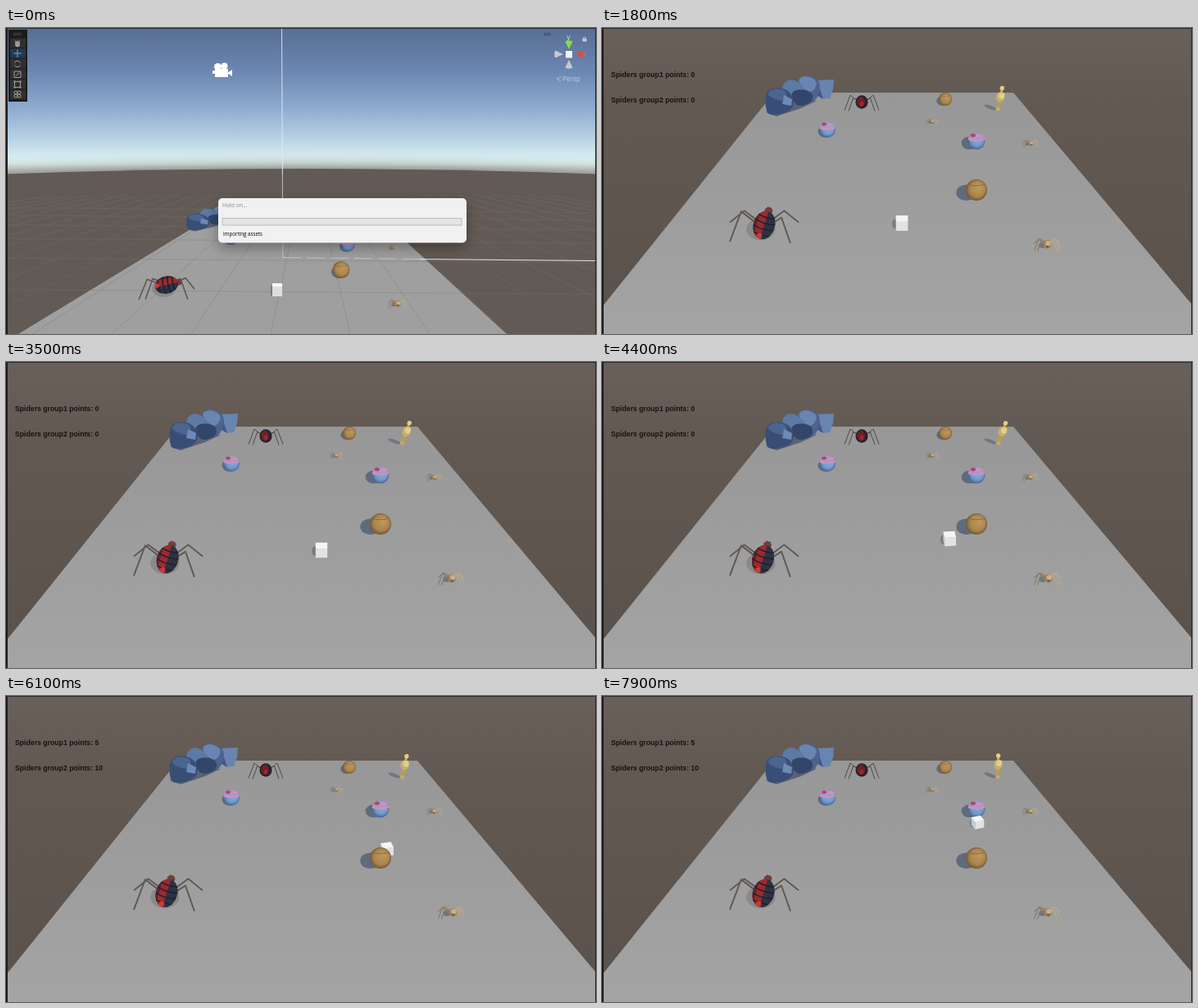
An HTML page with a canvas that plays this animation: 720 by 374 pixels, repeating every 8000 ms.

```html
<!DOCTYPE html>
<html lang="en">
<head>
<meta charset="utf-8">
<title>Spider game</title>
<style>
html, body { margin: 0; width: 100%; height: 100%; overflow: hidden; background: #5d5650; }
canvas { display: block; }
</style>
</head>
<body>
<canvas id="stage" width="720" height="374"></canvas>
<script>
const W = 720, H = 374, LOOP = 8000, PLAY = 1800;
const c = document.getElementById('stage').getContext('2d');

function poly(points, fill) {
  c.beginPath();
  for (let i = 0; i < points.length; i += 2) c.lineTo(points[i], points[i + 1]);
  c.closePath();
  c.fillStyle = fill;
  c.fill();
}
// Closed curve that rounds off every corner of the outline
function blob(points, fill) {
  const n = points.length;
  c.beginPath();
  for (let i = 0; i <= n; i += 2) {
    const x = points[i % n], y = points[(i + 1) % n];
    const mx = (x + points[(i + 2) % n]) / 2, my = (y + points[(i + 3) % n]) / 2;
    if (i) c.quadraticCurveTo(x, y, mx, my);
    else c.moveTo(mx, my);
  }
  c.fillStyle = fill;
  c.fill();
}
function line(points, color, width = 1) {
  c.beginPath();
  for (let i = 0; i < points.length; i += 2) c.lineTo(points[i], points[i + 1]);
  c.strokeStyle = color;
  c.lineWidth = width;
  c.stroke();
}
function oval(x, y, rx, ry, fill, turn = 0) {
  c.beginPath();
  c.ellipse(x, y, rx, ry, turn, 0, 7);
  c.fillStyle = fill;
  c.fill();
}
function bowl(x, y, rx, ry, color, width) {
  c.beginPath();
  c.ellipse(x, y, rx, ry, 0, 0, Math.PI);
  c.strokeStyle = color;
  c.lineWidth = width;
  c.stroke();
}
function rect(x, y, w, h, fill) {
  c.fillStyle = fill;
  c.fillRect(x, y, w, h);
}
function text(str, x, y, font, fill) {
  c.font = font;
  c.fillStyle = fill;
  c.fillText(str, x, y);
}
function fade(y, ...stops) {
  const g = c.createLinearGradient(0, 0, 0, y);
  stops.forEach(([at, color]) => g.addColorStop(at, color));
  return g;
}
function at(x, y, sx, sy, draw) {
  c.save();
  c.translate(x, y);
  c.scale(sx, sy);
  draw();
  c.restore();
}

function ball(x, y, r, pink, shadow = 1) {
  oval(x - r * shadow, y + r * .25, r * .95, r * .75, '#5f6b7c');
  const g = c.createRadialGradient(x + r * .3, y - r * .3, r * .1, x, y, r * 1.05);
  const tones = pink ? ['#84b2da', '#7098c8', '#415b88'] : ['#bd985d', '#aa864e', '#6b5230'];
  tones.forEach((tone, i) => g.addColorStop([0, .65, 1][i], tone));
  oval(x, y, r, r, g);
  c.save();
  c.beginPath();
  c.arc(x, y, r, 0, 7);
  c.clip();
  if (pink) {
    oval(x, y - r * .6, r * 1.05, r * .7, '#a996c8');
    bowl(x, y - r * .35, r, r * .28, '#c793bd', r * .2);
    bowl(x, y - r * .8, r * .9, r * .25, '#d292b4', r * .22);
    oval(x - r * .4, y - r * .65, r * .3, r * .2, '#a84a6a');
  } else {
    bowl(x, y - r * .65, r * .8, r * .25, '#836237', Math.max(.5, r * .06));
  }
  c.restore();
}

// Leg shapes: knee x, y and foot x, y, in units of half the span
const LEG = {
  wide: [.67, -.4, 1, .48], near: [.5, -.22, .76, .52], far: [.58, -.42, 1, -.08],
  low: [.7, -.2, 1, .53], front: [.68, -.25, 1, .15],
};

function legs(size, side, names, color, width) {
  names.forEach((name, i) => {
    const [kx, ky, fx, fy] = LEG[name].map(v => v * size);
    line([side * size * .15, -size * .1 * i, side * kx, ky, side * fx, fy], color, width);
  });
}
function bigSpider(x, y, size, left, right, turn, sway) {
  at(x, y, 1, 1, () => {
    oval(-size * .1, size * .12, size * .42, size * .32, '#0002');
    for (const [side, names] of [[-1, left], [1, right]]) {
      legs(size, side, names, '#454244', size * .042);
      legs(size, side, names, '#827263', size * .017);
    }
    c.translate(sway, 0);
    c.rotate(turn);
    const rx = size * .31, ry = size * .42;
    oval(0, -ry * 1.05, rx * .38, ry * .24, '#67453c');
    line([-2, -ry * 1.1, -2, -ry * 1.3], '#8e2f2f', 1.2);
    line([2, -ry * 1.1, 2, -ry * 1.3], '#8e2f2f', 1.2);
    oval(0, 0, rx, ry, '#2c3243');
    c.beginPath();
    c.ellipse(0, 0, rx, ry, 0, 0, 7);
    c.clip();
    rect(-rx, -ry, rx, ry * 2, '#9c2a2f');
    rect(-rx, -ry, rx * .3, ry * 2, '#5c2430');
    for (let k = -.75; k < 1; k += .42) bowl(0, ry * k, rx * 1.05, ry * .2, '#1d202b', 1.5);
    oval(-rx * .15, ry * .82, rx * .25, ry * .2, '#cf3a33');
  });
}
function redSpider(x, y, size) {
  at(x, y, 1, 1, () => {
    for (const side of [-1, 1]) legs(size, side, ['wide', 'near'], '#4a4547', size * .045);
    oval(0, 0, size * .36, size * .39, '#26222c');
    oval(-size * .04, -size * .02, size * .23, size * .3, '#6c222a');
    oval(0, size * .1, size * .1, size * .14, '#a32830');
  });
}
function tanSpider(x, y, size, sway = 0) {
  at(x, y, 1, 1, () => {
    oval(-size * .35, size * .08, size * .3, size * .2, '#6f7581');
    const width = Math.max(.6, size * .07);
    legs(size, -1, ['wide', 'near', 'far'], '#8a7866', width);
    legs(size, 1, ['wide', 'near', 'far'], '#bda88c', width);
    oval(sway, 0, size * .3, size * .33, '#a08259');
    oval(sway + size * .06, -size * .08, size * .2, size * .18, '#ccb088');
    oval(sway, size * .18, size * .1, size * .07, '#6a523d');
  });
}
function figure(x, y, scale, lean) {
  oval(x - 9 * scale, y - 4, 8 * scale, 2.2, '#6f7883', .35);
  at(x, y, scale, scale, () => {
    c.rotate(lean);
    poly([-3, -13, 3, -13, 2, -1, -2, -1], '#b59c5c');
    oval(0, -2, 2.8, 2.2, '#c5ab62');
    oval(0, -17, 5.2, 6.2, '#c5ae6b');
    oval(1.2, -19, 3.6, 4, '#e2cf8a');
    rect(-1.4, -27, 2.8, 5, '#c7ae65');
    oval(0, -28, 2.7, 2.7, '#e4ce80');
  });
}
function cube(x, y, turn, scale) {
  const ring = [0, 1, 2, 3].map(i => {
    const a = turn + Math.PI / 4 + i * Math.PI / 2;
    return [10.4 * Math.cos(a) * scale, 5.5 * Math.sin(a) * scale];
  });
  const h = 5.5 * scale;
  oval(x - 8 * scale, y + 1, 4 * scale, 6 * scale, '#747d88');
  at(x, y, 1, 1, () => {
    ring.forEach(([x1, y1], i) => {
      const [x2, y2] = ring[(i + 1) % 4];
      if (x1 > x2) poly([x1, y1 - h, x2, y2 - h, x2, y2 + h, x1, y1 + h], y1 < y2 ? '#e2e2e2' : '#c8cacd');
    });
    poly(ring.flatMap(([px, py]) => [px, py - h]), '#f5f5f5');
  });
}
function shells() {
  poly([200, 103, 213, 108, 243, 98, 262, 89, 234, 90], '#5a6372');
  poly([262, 64, 283, 63, 282, 75, 278, 86, 270, 87, 260, 76], '#6884b0');
  poly([262, 63, 270, 87, 258, 80], '#435880');
  blob([235, 66, 249, 56, 266, 64, 266, 80, 256, 94, 240, 86], '#4b638e');
  blob([237, 64, 249, 57, 265, 66, 254, 82], '#6a85b1');
  blob([219, 69, 231, 61, 248, 72, 246, 86, 231, 96, 221, 86], '#5d79a5');
  blob([229, 78, 245, 74, 258, 80, 256, 92, 236, 97], '#33466a');
  blob([200, 78, 212, 72, 228, 76, 236, 90, 229, 103, 203, 108, 199, 95], '#394e75');
  blob([201, 80, 211, 73, 227, 77, 223, 91, 206, 85], '#4c6590');
  poly([222, 82, 232, 87, 231, 95, 220, 93], '#6d89b5');
}

function cone(x, y, turn, fill) {
  c.save();
  c.translate(x, y);
  c.rotate(turn);
  poly([0, 0, -4.3, -9, 4.3, -9], fill);
  oval(0, -9, 4.3, 1.7, fill);
  c.restore();
}
function toolbar() {
  rect(3, 2, 23, 88, '#1b1b1b');
  line([9, 6.5, 19, 6.5], '#444');
  line([9, 8.5, 19, 8.5], '#444');
  for (let i = 0; i < 6; i++) rect(5, 12.5 + i * 12.6, 19, 11.6, i == 1 ? '#203a52' : '#303030');
  const ink = '#9c9c9c';
  oval(14, 20, 3, 3.2, ink);
  for (let i = -1; i < 3; i++) line([14 + i * .7, 20, 13 + i * 1.8, 15.5], ink, 1.1);
  line([9, 31, 19, 31], '#7fa3c4');
  line([14, 26.5, 14, 36], '#7fa3c4');
  c.beginPath();
  c.arc(14, 44, 3.7, .4, 2.8);
  c.moveTo(10.4, 43);
  c.arc(14, 44, 3.7, 3.4, 5.9);
  c.strokeStyle = ink;
  c.stroke();
  c.strokeRect(10, 53, 8, 7.5);
  line([12, 58.5, 16.5, 54.5], ink);
  c.strokeRect(10.5, 65.5, 7, 7);
  for (const [x, y] of [[10.5, 65.5], [17.5, 65.5], [10.5, 72.5], [17.5, 72.5]]) rect(x - 1, y - 1, 2, 2, ink);
  for (const [x, y] of [[12, 79], [16, 79], [12, 83], [16, 83]]) {
    c.beginPath();
    c.arc(x, y, 2, 0, 7);
    c.stroke();
  }
}
function gizmo() {
  line([656, 6.5, 665, 6.5], '#3d4a60');
  line([656, 8.5, 665, 8.5], '#3d4a60');
  text('y', 684, 14, '9px Inter, sans-serif', '#b5ee88');
  cone(687, 26, 0, '#82dc48');
  cone(694, 32, Math.PI / 2, '#d4513f');
  cone(680, 32, -Math.PI / 2, '#c5c9cf');
  cone(687, 39, Math.PI, '#c5c9cf');
  text('x', 704, 34, '7px Inter, sans-serif', '#dd675a');
  rect(683, 28, 8, 8.5, '#f1f1f1');
  rect(703.5, 13, 5, 3.5, '#c6ccd5');
  c.beginPath();
  c.arc(706, 13, 1.7, Math.PI, 0);
  c.strokeStyle = '#c6ccd5';
  c.lineWidth = 1;
  c.stroke();
  line([677, 59.5, 672, 62, 677, 64.5], '#b9c6d9', .9);
  text('Persp', 679, 65.2, '8px Inter, sans-serif', '#bfcbdc');
}
function dialog(alpha) {
  c.save();
  c.globalAlpha = alpha;
  c.shadowColor = '#0005';
  c.shadowBlur = 16;
  c.shadowOffsetY = 6;
  c.beginPath();
  c.roundRect(259, 208, 303, 54.5, 5);
  c.fillStyle = '#f1f1f1';
  c.fill();
  c.shadowColor = 'transparent';
  rect(264, 232.5, 292, 8.5, '#e4e4e4');
  c.strokeStyle = '#bcbcbc';
  c.lineWidth = 1;
  c.strokeRect(264, 232.5, 292, 8.5);
  text('Hold on...', 264, 219, '6.8px "Open Sans", sans-serif', '#858c86');
  text('Importing assets', 265, 253.5, '500 6.2px "Open Sans", sans-serif', '#000');
  c.restore();
}

function ground() {
  c.save();
  c.shadowColor = '#665e58';
  c.shadowBlur = 18;
  c.beginPath();
  c.moveTo(-40, 180);
  c.quadraticCurveTo(360, 164, 760, 180);
  c.lineTo(760, 420);
  c.lineTo(-40, 420);
  c.fillStyle = '#625a54';
  c.fill();
  c.restore();
}
function grid(color) {
  for (let k = -14; k <= 14; k++) {
    const low = 323 + 97 * k, mix = .22;
    line([370 + (low - 370) * mix, 156 + 218 * mix, low, 374], color, .7);
  }
  for (let k = -3; k < 4; k++) {
    const y = 156 + 1 / (.0096 - .0018 * k);
    line([0, y - 3, W, y + 3], color, .7);
  }
}
function editor(t) {
  rect(0, 0, W, H, fade(174, [0, '#586e94'], [.3, '#6b86b0'], [.55, '#8ca9cd'], [.75, '#b2cce1'], [.89, '#d4e9ef'], [.95, '#daeeed'], [1, '#d0d8d6']));
  ground();
  grid('#6f6760');
  poly([240, 237, 462, 237, 611, 374, 15, 374], '#9f9fa0');
  c.save();
  c.clip();
  grid('#8a8a8a');
  c.restore();
  line([336.5, 0, 337.4, 180], '#e3ebef', .9);
  line([337.4, 180, 337.8, 281], '#d2d3d1', .8);
  c.setLineDash([22, 7]);
  line([338, 280.5, 505, 282.5], '#c8c9c8', .9);
  c.setLineDash([]);
  line([505, 282.5, W, 284.5], '#e8e8e4', 1.1);
  oval(338, 255, 1.2, 1.2, '#e3d9b4');

  at(222, 218, .827, .62, () => { c.translate(-202, -59); shells(); });
  redSpider(313, 239, 16);
  ball(393, 238, 6.5, false, .3);
  figure(444, 249, .86, 0);
  tanSpider(378, 254, 4.5);
  ball(275, 257, 8, true, .2);
  ball(417, 265, 8.5, true, .2);
  tanSpider(473, 269, 6);
  ball(409, 295.5, 10.5, false, .2);
  bigSpider(196, 314, 34, ['low', 'near'], ['front', 'near'], 1.35, 0);
  rect(323, 315, 3, 12, '#737c87');
  rect(325, 312, 12, 16, '#dedede');
  rect(325, 312, 12, 4, '#f8f8f8');
  tanSpider(478, 337, 12);

  oval(258.5, 47.5, 4.5, 4.5, '#fff');
  oval(266.5, 46.5, 4, 4, '#fff');
  rect(255, 50, 16, 10, '#fff');
  rect(252, 52, 3, 4, '#fff');
  poly([270, 55, 276, 51, 276, 59], '#fff');
  toolbar();
  gizmo();
  if (t < 1600) dialog(t < 1500 ? 1 : .4);
}

// Cube path: time, x, y, turn, scale
const PATH = [
  [1800, 366, 238.5, 0, 1],
  [3500, 385, 230, 0, .98],
  [5300, 463.5, 202, -.25, .92],
  [6900, 466.5, 172.5, -.3, .84],
  [7900, 458.5, 154.5, -.4, .81],
];
function cubePose(t) {
  const i = Math.max(1, PATH.findIndex(p => p[0] >= t));
  const a = PATH[i - 1], b = PATH[i];
  const k = (t - a[0]) / (b[0] - a[0]);
  return a.slice(1).map((v, n) => v + (b[n + 1] - v) * k);
}
function game(t) {
  const s = (t - PLAY) / 1000;
  const sway = Math.cos(s * Math.PI / 4);
  rect(0, 0, W, H, fade(H, [0, '#6a605b'], [.25, '#625952'], [1, '#59514b']));
  poly([210, 79, 502, 79, 720, 338, 720, 374, 0, 374, 0, 341], fade(H, [.2, '#979797'], [1, '#a4a4a4']));
  shells();
  redSpider(317, 90.5, 21);
  ball(419, 87, 8, false, .4);
  figure(483, 101, 1, .19 + .17 * Math.sin(8.008 * s));
  tanSpider(403, 114.5, 8);
  ball(275, 124, 10, true, .2);
  ball(457, 138, 10.5, true, .8);
  tanSpider(523, 141, 10, sway * .5);
  cube(...cubePose(t));
  ball(457, 198, 13, false, .95);
  bigSpider(198, 241, 42, ['wide', 'far'], ['near', 'far'], .3, sway - 1);
  tanSpider(543.5, 264.5, 16, 1 - sway);

  const scored = t >= 5000;
  const font = 'bold 8.7px "Liberation Sans", Arial, sans-serif';
  text('Spiders group1 points: ' + (scored ? 5 : 0), 11, 59.5, font, '#151312');
  text('Spiders group2 points: ' + (scored ? 10 : 0), 11, 91, font, '#151312');
}

function frame(now) {
  const t = Math.floor(now % LOOP / 100) * 100;
  c.lineJoin = 'round';
  if (t < PLAY) editor(t);
  else game(t);
  rect(0, 0, 2, H, '#1d1b1b');
  rect(719, 0, 1, H, '#2b2827');
  rect(0, 0, W, 1, '#292d32');
  requestAnimationFrame(frame);
}
requestAnimationFrame(frame);
</script>
</body>
</html>
```
